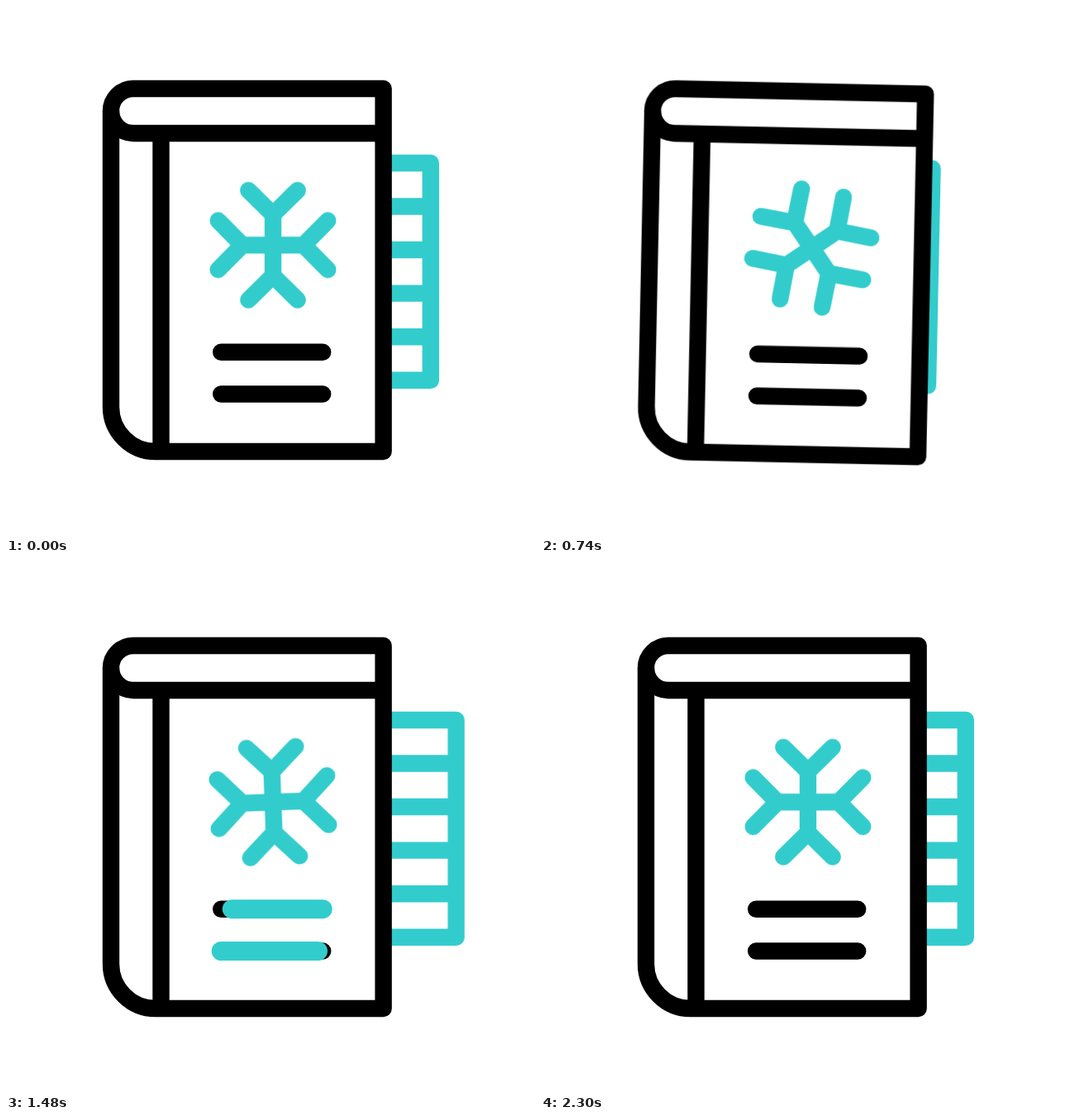
Write an HTML page that moves like this. It is 640 px wide and 640 px high and loops after 2420 ms.

```html
<!DOCTYPE html>
<html lang="en">
<head>
<meta charset="utf-8">
<title>Winter book</title>
<style>
  html, body { margin: 0; width: 100%; height: 100%; overflow: hidden; background: #fff; }
  svg { display: block; width: 100%; height: 100%; }
  path, line { fill: none; stroke-width: 20.4; stroke-linejoin: round; }
  .ink { stroke: #000; }
  .ice { stroke: #33cccd; }
  .round { stroke-linecap: round; }
  .cover { fill: #fff; }

  /* one shared 2420 ms clock */
  .book, .tabs, .flake, .fill {
    animation: 2420ms cubic-bezier(.3333, 0, .6667, 1) infinite;
  }
  .book { transform-origin: 154px 511px; animation-name: rock; }
  .tabs { animation-name: slide; }
  .flake { animation-name: spin; }
  .fill { stroke-width: 23; stroke-dasharray: 1 2; }
  .first { animation-name: sweep1; }
  .second { animation-name: sweep2; }

  @keyframes rock {
    0%, 12.397% { transform: rotate(0deg); }
    22.934% { transform: rotate(-4deg); }
    34.421% { transform: rotate(3deg); }
    45.455%, 100% { transform: rotate(0deg); }
  }
  @keyframes slide {
    0%, 12.397% { transform: translateX(0); }
    26.157%, 34.421% { transform: translateX(-47px); }
    63.347% { transform: translateX(32px); }
    79.876%, 100% { transform: translateX(0); }
  }
  @keyframes spin {
    0%, 12.397% { transform: rotate(0deg); }
    19.835% { transform: rotate(90deg); }
    95.041%, 100% { transform: rotate(-540deg); }
  }
  /* the stroke draws in from the left, then wipes out to the right */
  @keyframes sweep1 {
    0%, 41.322% { stroke-dashoffset: 1; visibility: hidden; }
    57.851% { stroke-dashoffset: 0; visibility: visible; }
    74.38%, 100% { stroke-dashoffset: -1; visibility: hidden; }
  }
  @keyframes sweep2 {
    0%, 46.818% { stroke-dashoffset: 1; visibility: hidden; }
    63.347% { stroke-dashoffset: 0; visibility: visible; }
    79.876%, 100% { stroke-dashoffset: -1; visibility: hidden; }
  }
</style>
</head>
<body>
<svg viewBox="0 0 640 640">
  <defs>
    <path id="arm" class="ice round" d="M0 0V-37M-29.7-66.3L0-37L29.7-66.3"/>
  </defs>
  <g class="book">
    <g class="tabs">
      <path class="ice" d="M400 190H513.8V452.8H400M400 242.5H513M400 295H513M400 347.6H513M400 400.2H513"/>
    </g>
    <path class="ink cover" d="M456.6 100H154A27 27 0 0 0 127 127V485A54 54 0 0 0 181 539H456.6Z"/>
    <path class="ink" d="M127 127A27 27 0 0 0 154 154H456.6M187.5 154V539"/>
    <g transform="translate(323 289.3)">
      <g class="flake">
        <use href="#arm"/>
        <use href="#arm" transform="rotate(90)"/>
        <use href="#arm" transform="rotate(180)"/>
        <use href="#arm" transform="rotate(270)"/>
      </g>
    </g>
    <path class="ink round" d="M260.2 418.7H383.2M260.2 469.5H383.2"/>
    <line class="ice round fill first" pathLength="1" x1="260.2" y1="418.7" x2="383.2" y2="418.7"/>
    <line class="ice round fill second" pathLength="1" x1="260.2" y1="469.5" x2="383.2" y2="469.5"/>
  </g>
</svg>
</body>
</html>
```
